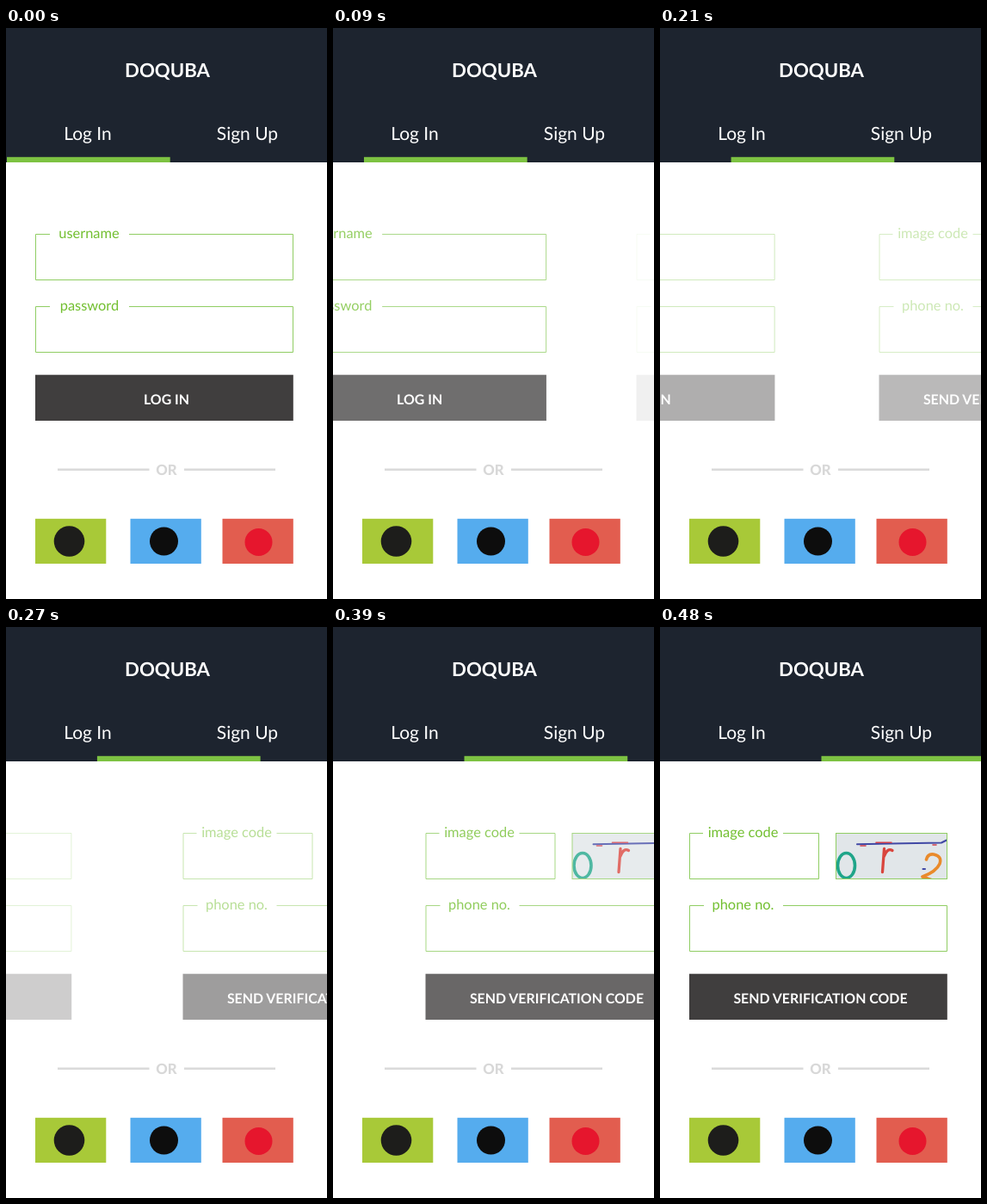
An HTML page that plays this animation: 373x663 px, repeating every 510 ms.

```html
<!DOCTYPE html>
<html lang="en">
<head>
<meta charset="utf-8">
<title>Log in and sign up</title>
<style>
  html, body { margin: 0; width: 100%; height: 100%; overflow: hidden; background: #fff; }
  svg { display: block; width: 100%; height: 100%; }
  text { font-family: Lato, "Open Sans", sans-serif; text-anchor: middle; text-rendering: geometricPrecision; fill: #fff; }
  .title { font-size: 22.2px; font-weight: 700; }
  .tab { font-size: 21px; }
  .label { font-size: 16.4px; fill: #72bf30; }
  .action { font-size: 15.9px; font-weight: 700; }
  .or { font-size: 16.7px; font-weight: 800; fill: #d8d8d8; }
  .field { fill: none; stroke: #90cd63; }
  .button { fill: #403e3e; }
  .ink { fill: none; stroke-linecap: round; stroke-linejoin: round; }
</style>
</head>
<body>
<svg viewBox="0 0 373 663">
  <defs>
    <clipPath id="code-clip"><rect x="204" y="239" width="130" height="54"/></clipPath>
    <path id="wide-field" d="M51 239.5H34.5V292.5H333.5V239.5H143"/>
    <rect id="button" x="34" y="402.7" width="299.8" height="53.3"/>
  </defs>

  <rect width="373" height="156" fill="#1d242f"/>
  <text class="title" x="187.5" y="57">DOQUBA</text>
  <text class="tab" x="95" y="129.5">Log In</text>
  <text class="tab" x="280.5" y="129.5">Sign Up</text>
  <rect id="bar" y="149.8" width="189.7" height="6.2" fill="#7dc242"/>

  <g id="login">
    <use href="#wide-field" class="field"/>
    <text class="label" x="96.5" y="243.5">username</text>
    <use href="#wide-field" y="84" class="field"/>
    <text class="label" x="97" y="327.5">password</text>
    <use href="#button" class="button"/>
    <text class="action" x="186.5" y="437">LOG IN</text>
  </g>

  <g id="signup">
    <path class="field" d="M50 239.5H34.5V292.5H184.5V239.5H143"/>
    <text class="label" x="96.5" y="243.5">image code</text>
    <g class="ink" clip-path="url(#code-clip)">
      <rect x="204" y="239" width="130" height="54" fill="#e1e6e9"/>
      <ellipse cx="216.5" cy="277" rx="10" ry="14.5" stroke="#1fa589" stroke-width="3.6"/>
      <path d="M260.5 257.5L258.5 284.5M260 267Q264 256 270 259.5" stroke="#d9453d" stroke-width="3.3"/>
      <path d="M309.5 270Q311 263 318 264Q328 266 325 275Q321 284 305 290L325 297" stroke="#e98a2b" stroke-width="3.6"/>
      <path d="M229 252.3L327 250.5L333 247.5M305.5 281H308" stroke="#4149a5" stroke-width="2"/>
      <path d="M233 254H239M251 250.2H269M317 253H321" stroke="#cf3f4c" stroke-width="1.6"/>
    </g>
    <rect class="field" x="204.5" y="239.5" width="129" height="53"/>
    <use href="#wide-field" y="84" class="field"/>
    <text class="label" x="96.5" y="327.5">phone no.</text>
    <use href="#button" class="button"/>
    <text class="action" x="186.5" y="437">SEND VERIFICATION CODE</text>
  </g>

  <path d="M60 512.7H166.5M207 512.7H313" stroke="#dadada" stroke-width="2.4"/>
  <text class="or" x="186.5" y="518.7">OR</text>

  <rect x="34" y="569.8" width="82.3" height="52.2" fill="#a8c938"/>
  <circle cx="73.5" cy="596" r="17.8" fill="#1d1d1b"/>
  <rect x="144.5" y="569.8" width="82.3" height="52.2" fill="#55acee"/>
  <circle cx="183.5" cy="596" r="16.5" fill="#0d0d0d"/>
  <rect x="251.5" y="569.8" width="82.3" height="52.2" fill="#e25d4f"/>
  <circle cx="293.5" cy="597" r="16" fill="#e6162d"/>
</svg>
<script>
  const LOOP = 510, TICK = 30, END = 480;
  const [bar, login, signup] = ["bar", "login", "signup"].map(id => document.getElementById(id));
  const clamp = v => Math.min(1, Math.max(0, v));

  function place(panel, x, opacity) {
    panel.setAttribute("transform", `translate(${x} 0)`);
    panel.setAttribute("opacity", clamp(opacity));
  }

  function draw() {
    // The motion advances in 30 ms ticks.
    const t = Math.floor(performance.now() % LOOP / TICK) * TICK;
    const p = t / END;
    bar.setAttribute("x", 1 + 186.5 * p);
    place(login, -458 * p, 1 - t / 360);
    place(signup, 392 * (1 - p), (t - 60) / 420);
    requestAnimationFrame(draw);
  }
  draw();
</script>
</body>
</html>
```
